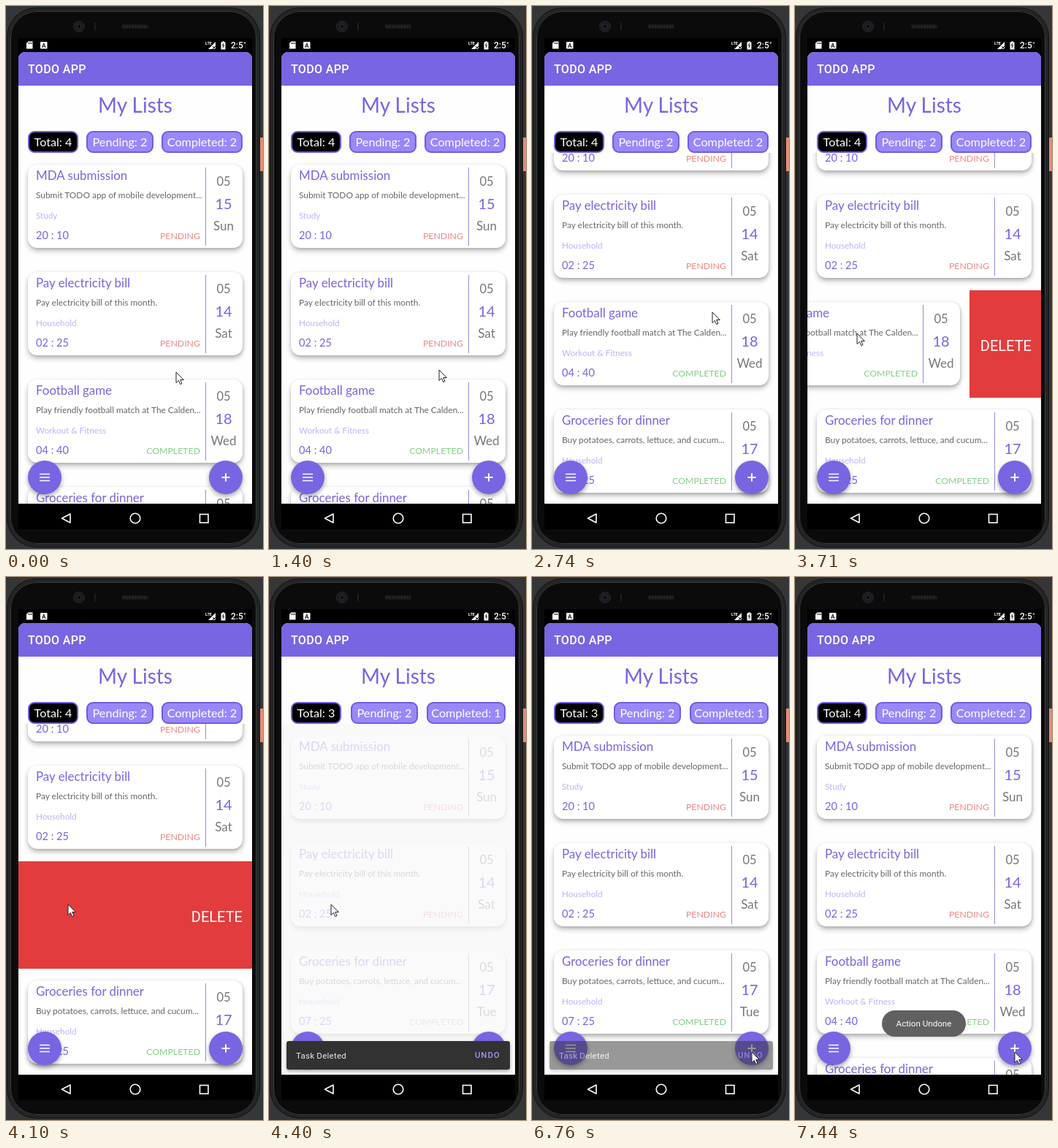
Recreate the animation shown at these times as an HTML page. Size 352 by 743 pixels, loop 8 s.

```html
<!DOCTYPE html>
<html lang="en">
<head>
<meta charset="utf-8">
<title>Todo app</title>
<style>
:root { --purple: #7865e2; --loop: 8s step-end infinite; }
* { box-sizing: border-box; }
html, body { margin: 0; width: 100%; height: 100%; overflow: hidden; background: #353638; }
#stage { position: relative; width: 352px; height: 743px; overflow: hidden; background: #353638; font-family: Lato, sans-serif; }
#stage div, #stage svg, .card span { position: absolute; white-space: nowrap; }

/* device */
.body { left: 2px; top: 3px; width: 345px; height: 737px; border-radius: 40px; background: #0b0b0c; border: 4px solid #242527; box-shadow: 0 0 0 1px #121213, inset 0 0 0 1px #3b3c3f; }
.power { left: 348px; top: 180px; width: 4px; height: 46px; background: #e58b78; }
.glass { left: 17px; top: 44px; width: 320px; height: 672px; background: #000; }
.page { left: 17px; top: 63px; width: 320px; height: 618px; background: #fefefe; border-radius: 9px 9px 0 0; overflow: hidden; }
.bar { inset: 0 0 auto; height: 46px; background: var(--purple); color: #fff; font: 500 16px/46px Roboto, sans-serif; letter-spacing: .35px; padding: 1px 0 0 13px; }
.clock { left: 308px; top: 45px; width: 20px; height: 18px; overflow: hidden; color: #fff; font: 500 12px/18px Roboto, sans-serif; }
.heading { left: 17px; top: 115px; width: 320px; text-align: center; color: var(--purple); font-size: 28px; line-height: 40px; }

/* counters */
.chip { top: 171px; height: 30px; border: 2px solid #6f5ddc; border-radius: 9px; background: #9988fa; color: #fff; font-size: 16.2px; line-height: 25px; text-align: center; }
.total { background: #000; }
.four { animation: whole var(--loop); }
.three { animation: reduced var(--loop); }

/* list */
.view { left: 17px; top: 201px; width: 320px; height: 480px; overflow: hidden; animation: tint var(--loop); }
.list { inset: 0; animation: scroll var(--loop), reload var(--loop); }
.row { left: 0; width: 320px; height: 147px; }
.card { left: 13px; top: 16px; width: 294px; height: 114px; border-radius: 13px; background: #fff; box-shadow: 0 4px 7px rgba(0,0,0,.27), 1px 1px 4px rgba(0,0,0,.13); }
.card span { left: 11px; line-height: 20px; }
.card .name { top: 4.5px; font-size: 16.9px; color: var(--purple); }
.card .note { top: 32.4px; font-size: 11.9px; color: #666; }
.card .kind { top: 59px; font-size: 11.7px; color: #bdb2f8; }
.card .time { top: 87px; font-size: 14.6px; color: var(--purple); }
.card .state { left: auto; right: 58px; top: 87.7px; font-size: 12.3px; color: #ed8585; }
.card .done { color: #84cf87; }
.card .rule { left: 243px; top: 4px; width: 1px; height: 107px; background: #958ae0; }
.card .month, .card .day, .card .week { left: 244px; width: 48px; text-align: center; color: #777; }
.card .month { top: 12.6px; font-size: 16.5px; }
.card .day { top: 43.3px; font-size: 20px; color: var(--purple); }
.card .week { top: 74.4px; font-size: 17px; }
#row2 { animation: whole var(--loop); }
#row2 .card { animation: swipe var(--loop); }
#row3 { animation: close-gap var(--loop); }
.delete { right: 0; top: 0; height: 147px; overflow: hidden; background: #e23c3d; animation: uncover var(--loop); }
.delete div { right: 13px; top: 64px; color: #fff; font: 20px/24px Roboto, sans-serif; }

/* overlays */
.fab { top: 622px; width: 46px; height: 46px; border-radius: 50%; background: var(--purple); box-shadow: 0 3px 6px rgba(0,0,0,.35); }
.fab svg { inset: 0; }
.snack { left: 24px; top: 635px; width: 306px; height: 39px; border-radius: 3px; background: #323232; color: #e8e8e8; font: 11.5px/40px Roboto, sans-serif; letter-spacing: .25px; padding-left: 13px; box-shadow: 0 2px 4px rgba(0,0,0,.35); animation: snack var(--loop); }
.undo { right: 6px; top: 5px; width: 48px; height: 29px; border-radius: 3px; color: #a594f4; font-size: 11.3px; line-height: 30px; font-weight: 500; letter-spacing: 1px; padding-left: 6px; animation: press var(--loop); }
.toast { left: 119px; top: 593px; width: 115px; height: 36px; border-radius: 18px; background: #606060; color: #fff; font: 11.6px/36px Roboto, sans-serif; text-align: center; animation: toast var(--loop); }
.cursor { left: 0; top: 0; animation: point var(--loop); }

@keyframes whole { 0% { visibility: visible } 53.125% { visibility: hidden } 86.25%, 100% { visibility: visible } }
@keyframes reduced { 0% { visibility: hidden } 53.125% { visibility: visible } 86.25%, 100% { visibility: hidden } }
@keyframes close-gap { 0% { transform: none } 53.125% { transform: translateY(-147px) } 86.25%, 100% { transform: none } }
@keyframes scroll {
  0% { transform: none }
  19% { transform: translateY(-14px) }
  20.875% { transform: translateY(-45px) }
  22.75% { transform: translateY(-72px) }
  24.25% { transform: translateY(-92px) }
  26.125% { transform: translateY(-106px) }
  53.125%, 100% { transform: none }
}
@keyframes reload {
  0% { opacity: 1 } 53.125% { opacity: 0 } 55% { opacity: .23 } 56.5% { opacity: 1 }
  86.25% { opacity: 0 } 87.75% { opacity: .1 } 89.625% { opacity: .3 } 91.125% { opacity: .8 } 93%, 100% { opacity: 1 }
}
@keyframes tint { 0% { background: #fefefe } 53.125% { background: #f9f9f9 } 56.5% { background: #fefefe } 86.25% { background: #f9f9f9 } 91.125%, 100% { background: #fefefe } }
@keyframes swipe {
  0% { transform: none }
  44.875% { transform: translateX(-42px) }
  46.375% { transform: translateX(-98px) }
  48.25% { transform: translateX(-215px) }
  49.75% { transform: translateX(-320px) }
  53.125%, 100% { transform: none }
}
@keyframes uncover { 0% { width: 0 } 44.875% { width: 42px } 46.375% { width: 98px } 48.25% { width: 215px } 49.75% { width: 320px } 53.125%, 100% { width: 0 } }
@keyframes snack { 0% { opacity: 0; transform: scale(.9) } 53.125% { opacity: .6; transform: scale(.95) } 55% { opacity: 1; transform: none } 84.5% { opacity: .5 } 86.25%, 100% { opacity: 0 } }
@keyframes press { 0% { background: transparent } 82.625% { background: #46434f } 84.5%, 100% { background: transparent } }
@keyframes toast { 0% { opacity: 0 } 87.75% { opacity: .3 } 89.625% { opacity: .8 } 91.125%, 100% { opacity: 1 } }
@keyframes point {
  0% { transform: translate(232px, 500px) }
  17.5% { transform: translate(232px, 497px) }
  19% { transform: translate(234px, 470px) }
  20.875% { transform: translate(238px, 435px) }
  22.75% { transform: translate(242px, 407px) }
  24.25% { transform: translate(244px, 388px) }
  26.125% { transform: translate(245px, 366px) }
  31.25% { transform: translate(245px, 374px) }
  32.75% { transform: translate(246px, 394px) }
  34.25% { transform: translate(246px, 418px) }
  35.75% { transform: translate(246px, 438px) }
  37.25% { transform: translate(246px, 449px) }
  43% { transform: translate(183px, 449px) }
  44.875% { transform: translate(120px, 448px) }
  46.375% { transform: translate(84px, 447px) }
  61.875% { transform: translate(130px, 480px) }
  63.375% { transform: translate(205px, 548px) }
  65.25% { transform: translate(269px, 600px) }
  67.125% { transform: translate(284px, 621px) }
  68.625% { transform: translate(293px, 635px) }
  70.5% { transform: translate(299px, 642px) }
  72.375% { transform: translate(301px, 644px) }
  74.25% { transform: translate(300px, 647px) }
  75.75%, 100% { transform: translate(300px, 649px) }
}
</style>
</head>
<body>
<div id="stage">
  <div class="body"></div>
  <div class="power"></div>
  <div class="glass"></div>
  <svg width="352" height="743" fill="none">
    <circle cx="100" cy="28" r="7.5" fill="#1b1c1f" stroke="#242528"/>
    <circle cx="100" cy="28" r="3" fill="#0c0d13" stroke="#2b2d38"/>
    <path d="M122 23v10" stroke="#1c1d1f" stroke-width="2"/>
    <rect x="158" y="25" width="37" height="6" rx="3" fill="#161617"/>
    <path d="M160 27h33M161 29h33" stroke="#3a3a3c" stroke-dasharray="2 2"/>
    <g fill="#fff">
      <path d="M30.500 48.500h6v10h-8.500v-7.500z"/>
      <rect x="47" y="49" width="9.500" height="9.500" rx="1"/>
      <path d="M287 49v10h-10z"/>
      <path d="M296 48.500h3v1h1.500v10h-6v-10h1.500z"/>
      <text x="273" y="52.500" font-size="5.500" font-weight="700" font-family="Roboto, sans-serif">LTE</text>
    </g>
    <path d="M31 50v2m2-2v2m2-2v2M49.500 57l2.250-6 2.250 6m-3.700-2h2.900M298 51l-1.500 3h2l-1.500 3M283 55l4 4m0-4l-4 4" stroke="#000"/>
    <g stroke="#fff" stroke-width="1.600">
      <path d="M88 695v12l-11.500-6z" stroke-linejoin="round"/>
      <circle cx="177" cy="701" r="6.800"/>
      <rect x="265.500" y="695.500" width="11.500" height="11.500"/>
    </g>
  </svg>
  <div class="clock">2:51</div>
  <div class="page"><div class="bar">TODO APP</div></div>

  <div class="view"><div class="list" id="list"></div></div>

  <div class="heading">My Lists</div>
  <div class="four">
    <div class="chip total" style="left:30px;width:69px">Total: 4</div>
    <div class="chip" style="left:110px;width:92px">Pending: 2</div>
    <div class="chip" style="left:213px;width:111px">Completed: 2</div>
  </div>
  <div class="three">
    <div class="chip total" style="left:30px;width:69px">Total: 3</div>
    <div class="chip" style="left:112px;width:92px">Pending: 2</div>
    <div class="chip" style="left:216px;width:108px">Completed: 1</div>
  </div>

  <div class="fab" style="left:30px"><svg width="46" height="46"><path d="M16 18.500h14M16 23h14M16 27.500h14" stroke="#fff" stroke-width="1.700"/></svg></div>
  <div class="fab" style="left:278px"><svg width="46" height="46"><path d="M17.500 23h11M23 17.500v11" stroke="#fff" stroke-width="2"/></svg></div>
  <div class="glass" style="top:681px;height:10px"></div>
  <div class="snack">Task Deleted<div class="undo">UNDO</div></div>
  <div class="toast">Action Undone</div>
  <svg class="cursor" width="16" height="22"><path d="M1 1v14.500l3.400-3.100 2.300 5.200 2.300-1-2.300-5.100h4.600z" fill="#fff" stroke="#222" stroke-linejoin="round"/></svg>
</div>
<script>
const tasks = [
  ['MDA submission', 'Submit TODO app of mobile development...', 'Study', '20 : 10', 'PENDING', '15', 'Sun'],
  ['Pay electricity bill', 'Pay electricity bill of this month.', 'Household', '02 : 25', 'PENDING', '14', 'Sat'],
  ['Football game', 'Play friendly football match at The Calden...', 'Workout &amp; Fitness', '04 : 40', 'COMPLETED', '18', 'Wed'],
  ['Groceries for dinner', 'Buy potatoes, carrots, lettuce, and cucum...', 'Household', '07 : 25', 'COMPLETED', '17', 'Tue']
];
const fields = ['name', 'note', 'kind', 'time', 'state', 'day', 'week'];

const row = (task, i) => {
  const spans = task.map((text, k) => {
    const done = text === 'COMPLETED' ? ' done' : '';
    return `<span class="${fields[k]}${done}">${text}</span>`;
  }).join('');
  const remove = i === 2 ? '<div class="delete"><div>DELETE</div></div>' : '';
  return `<div class="row" id="row${i}" style="top:${147 * i}px">${remove}
    <div class="card">${spans}<span class="month">05</span><span class="rule"></span></div></div>`;
};

document.getElementById('list').innerHTML = tasks.map(row).join('');
</script>
</body>
</html>
```
